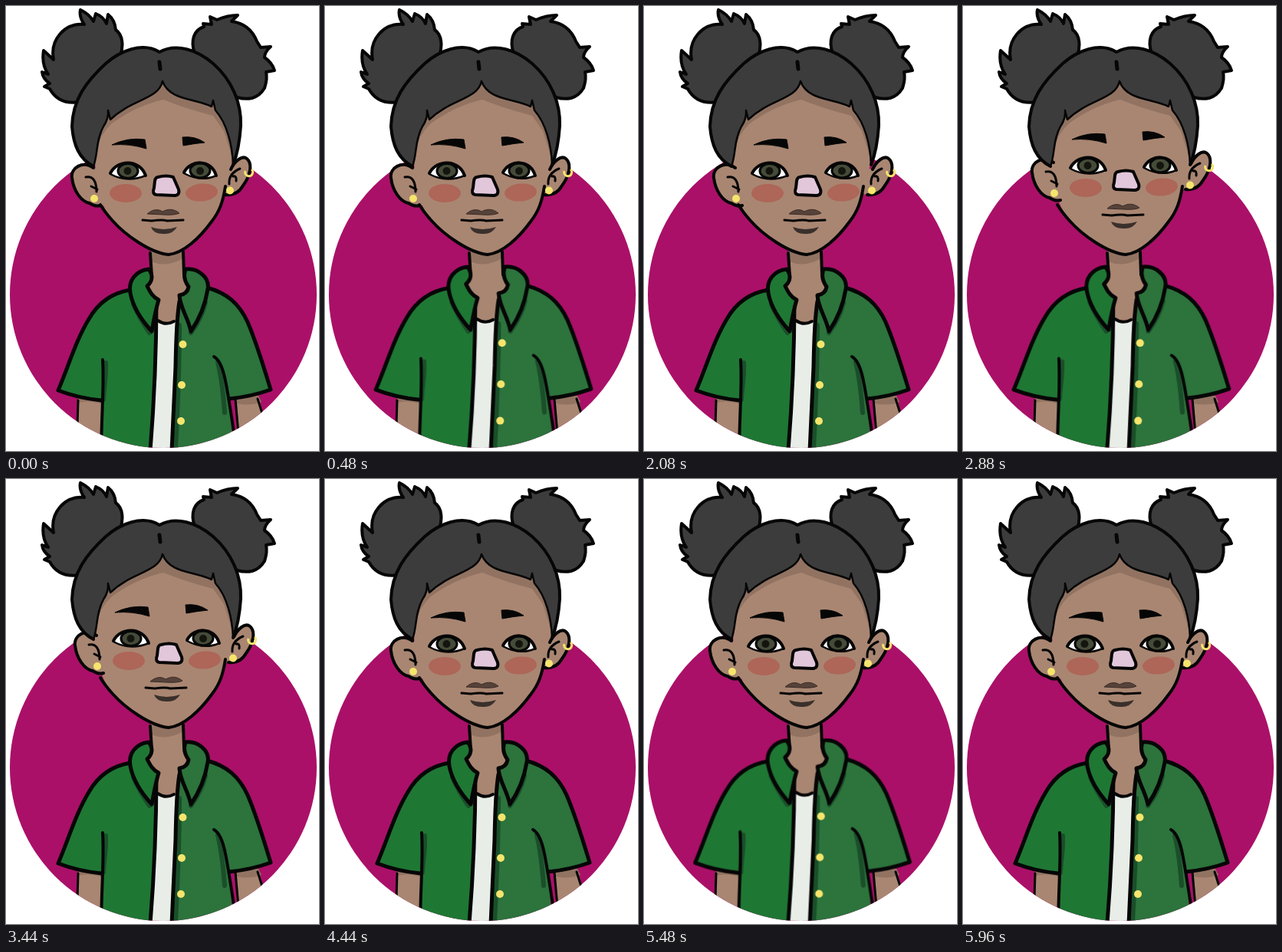
These frames come from a looping animation (408x580 px, 6000 ms). An HTML page:

```html
<!DOCTYPE html>
<html lang="en">
<head>
<meta charset="utf-8">
<title>Portrait</title>
<style>
html, body { margin: 0; width: 100%; height: 100%; overflow: hidden; background: #fff; }
svg { display: block; width: 100%; height: 100%; }
.line { fill: none; stroke: #060606; stroke-width: 4; stroke-linecap: round; stroke-linejoin: round; }
.hair { fill: #3c3c3c; stroke: #060606; stroke-width: 4; stroke-linejoin: round; }
.thin { stroke-width: 3; }
.bold { stroke-width: 5; }
.skin { fill: #a98672; }
.shade { fill: #927362; }
.left { fill: #1f7734; }
.right { fill: #2c733c; }
.fold { fill: none; stroke: #1a4f2a; stroke-width: 6; stroke-linecap: round; }
.gold { fill: #f5e56d; }
.turn { animation: turn 6s infinite ease-in-out; }
.breathe { transform-origin: 207px 580px; animation: breathe 6s infinite ease-in-out; }

@keyframes turn {
  0%, 10.4% { transform: translate(0, 0); }
  16.67%, 34.67% { transform: translate(5px, 0); }
  41.33%, 68% { transform: translate(4px, -7px); }
  74%, 100% { transform: translate(0, 0); }
}
@keyframes breathe {
  0% { transform: scale(1); }
  7% { transform: scale(1.013); }
  16.67%, 40% { transform: scale(1); }
  47.3% { transform: scale(1.013); }
  57.3%, 80% { transform: scale(1); }
  87.3% { transform: scale(1.013); }
  99.3%, 100% { transform: scale(1); }
}
</style>
</head>
<body>
<svg viewBox="0 0 408 580">
  <defs>
    <clipPath id="disc"><circle cx="205" cy="376" r="200"/></clipPath>
  </defs>

  <g clip-path="url(#disc)">
    <rect y="170" width="408" height="410" fill="#aa1068"/>

    <!-- arms -->
    <path class="skin" d="M94 508 L127 508 L125 580 L92 580 Z M299 508 L329 508 L342 560 L302 575 Z"/>
    <path class="shade" d="M94 508 L127 508 L126 519 Q108 513 94 517 Z M299 508 L329 508 L333 516 Q318 522 301 518 Z"/>
    <path class="line thin" d="M94 514 L93 548 M299 512 L303 558 M328 512 L340 550"/>

    <!-- neck -->
    <path class="skin" d="M188 310 L232 310 L233 350 L240 372 L226 384 L219 420 L198 420 L197 384 L182 366 L190 350 Z"/>
    <path class="shade" d="M188 314 L232 314 L232 328 Q210 342 189 333 Z"/>
    <path class="line" d="M188 322 L190 352 M231 320 L232 350"/>

    <g class="breathe">
      <path fill="#e8eee7" d="M198 411 Q209 418 221 410 L216 585 L188 585 Z"/>
      <path class="line" d="M198 410 Q208 417 219 411"/>

      <path class="left" d="M163 370 C137 374 120 387 108 408 C91 436 82 468 68 501 Q94 511 124 514 L124 590 L188 590 L198 384 Z"/>
      <path class="right" d="M262 367 C288 374 304 388 315 412 C327 440 335 467 345 500 Q320 509 291 512 L297 590 L216 590 L221 470 L228 381 Z"/>
      <path class="fold" d="M130 465 C131 485 127 500 127 513 M166 389 Q174 407 187 426 M226 416 Q226 480 221 577 M276 464 Q282 488 285 530 M241 426 Q255 407 260 387"/>
      <path class="line bold" d="M162 370 C137 374 120 387 108 408 C91 436 82 468 68 501 Q94 511 124 514 M262 367 C288 374 304 388 315 412 C327 440 335 467 345 500 Q320 509 291 512 M196 385 Q196 480 188 580 M226 385 Q222 410 221 470 L216 580"/>
      <path class="line" d="M126 461 C128 495 125 520 124 580 M271 457 C284 464 287 490 297 555"/>

      <path class="line bold" style="fill:#1f7734" d="M186 343 C169 345 159 358 162 374 C166 395 178 411 190 424 C193 407 195 396 199 383 C191 379 188 373 184 365 C191 359 192 351 186 343 Z"/>
      <path class="line bold" style="fill:#2c733c" d="M234 343 C250 341 266 354 263 369 C259 394 250 411 241 424 C237 405 227 394 226 377 C233 376 237 372 238 366 C233 359 231 351 234 343 Z"/>

      <g class="gold">
        <circle cx="230.500" cy="441" r="5"/>
        <circle cx="229" cy="494" r="5"/>
        <circle cx="228" cy="541" r="5"/>
      </g>
    </g>
  </g>

  <!-- face -->
  <path class="skin" d="M116 205 L119 165 L150 100 L260 100 L294 165 L296 205 Q288 225 286 237 C283 254 279 267 268 281 C252 303 231 322 212 324 C188 322 155 298 139 280 Q119 257 116 205 Z"/>

  <!-- ears -->
  <g class="turn">
    <path class="skin" d="M126 212 L113 211 C100 201 84 211 86 224 C88 241 98 255 109 257 Q119 263 127 260 Z M272 208 L293 213 C298 202 308 194 314 199 C322 206 318 222 309 234 C304 243 296 247 284 246 L272 240 Z"/>
    <path class="line" d="M114 211 C100 201 84 211 86 224 C88 241 98 255 109 257 Q117 262 123 260 M293 213 C298 202 308 194 314 199 C322 206 318 222 309 234 C304 243 296 247 286 246"/>
    <path class="line thin" d="M104 223 C113 221 118 228 118 242 M111 235 L119 239 M291 232 C290 221 298 215 305 212 M296 222 Q301 221 300 228"/>
  </g>
  <path class="line" d="M123 259 Q129 269 139 280 C155 298 188 322 212 324 C231 322 252 303 268 281 C279 267 283 254 286 235"/>
  <path class="shade" d="M117 190 L120 165 L135 143 L204 96 L270 130 L292 170 L295 198 L284 163 L270 143 Q235 134 205 122 Q170 130 138 153 Q122 168 117 190 Z"/>

  <!-- hair -->
  <path class="hair" d="M102 124 C85 128 67 126 57 108 L50 105 L57 101 Q48 95 47 86 L55 89 Q46 76 49 58 L62 70 C57 44 76 22 102 24 Q95 14 97 5 Q108 10 114 20 L117 10 Q127 14 131 23 L133 11 Q142 18 143 31 C153 38 153 53 149 65 Z"/>
  <path class="hair" d="M246 62 C240 45 245 31 258 27 L257 23 L268 24 L266 14 L275 18 Q289 12 302 12 L294 20 C309 22 321 31 327 46 L332 54 L345 53 Q337 60 337 67 Q347 74 350 84 L339 86 Q341 95 337 107 Q331 117 321 120 Q311 122 301 119 Z"/>
  <path fill="#3c3c3c" d="M114 209 C95 199 88 181 86 157 C87 122 104 99 130 75 C148 59 178 46 200 60 C222 48 249 57 270 75 C295 97 307 127 306 156 Q304 187 296 207 C295 181 288 153 273 136 L270 123 L268 131 C245 120 213 123 204 98 C199 122 164 121 136 148 L133 136 Q134 147 127 157 C117 175 120 193 114 209 Z"/>
  <path class="line" d="M114 209 C95 199 88 181 86 157 C87 122 104 99 130 75 C148 59 178 46 200 60 C222 48 249 57 270 75 C295 97 307 127 306 156 Q304 187 296 207"/>
  <path class="line" style="stroke-width:2.500" d="M296 207 C295 181 288 153 273 136 L270 123 L268 131 C245 120 213 123 204 98 C199 122 164 121 136 148 L133 136 Q134 147 127 157 C117 175 120 193 114 209"/>
  <path class="line bold" d="M200 73 L201 82"/>

  <g class="turn">
    <!-- brows -->
    <path fill="#060606" stroke="#060606" stroke-linejoin="round" d="M138 181 Q158 171 181 174 L183 186 Q161 179 138 181 Z M230 171 Q246 169 259 178 Q247 179 231 182 Z"/>
    <!-- cheeks -->
    <g fill="#ad6658">
      <ellipse cx="156" cy="244" rx="21" ry="12"/>
      <ellipse cx="255" cy="243" rx="21" ry="11.500" transform="rotate(-5 255 243)"/>
    </g>
    <!-- eyes -->
    <path fill="#fff" d="M136 219 C145 200 174 199 182 221 Q160 230 136 219 Z M232 218 C241 200 267 199 274 221 Q253 228 232 218 Z"/>
    <g class="line thin" style="fill:#444b38">
      <ellipse cx="159" cy="215" rx="13" ry="9.500"/>
      <ellipse cx="253" cy="214.500" rx="13" ry="9.500"/>
    </g>
    <g fill="#14150f">
      <circle cx="158.500" cy="215" r="5"/>
      <circle cx="253" cy="215" r="5"/>
    </g>
    <path class="line" d="M136 218 C145 200 174 199 182 221 M232 217 C241 200 267 199 274 221"/>
    <path class="line" style="stroke-width:2.500" d="M136 219 Q158 231 182 221 M232 218 Q254 230 274 221"/>
    <!-- nose patch -->
    <path class="line" style="fill:#e2c7db" d="M198 223 Q209 220 218 223 L225 239 Q227 247 219 247 L196 246 Q190 245 193 237 L194 228 Q195 223 198 223 Z"/>
    <!-- mouth -->
    <path fill="#564239" stroke="#3a2c26" d="M184 271 C191 265 198 264 204 268 C211 264 219 264 226 270 Q220 273 205 272 Z"/>
    <path class="line thin" d="M178 279 L190 280 Q204 278 210 280 L231 279"/>
    <path fill="#3a302b" d="M189 288 Q205 294 223 288 Q217 298 205 297 Q192 297 189 288 Z"/>
    <!-- earrings -->
    <g class="gold">
      <circle cx="115" cy="251" r="5"/>
      <circle cx="292" cy="240.500" r="5"/>
    </g>
    <path fill="none" stroke="#f5e56d" stroke-width="3" d="M312 215 A5 5 0 1 0 320 213"/>
  </g>
</svg>
</body>
</html>
```
